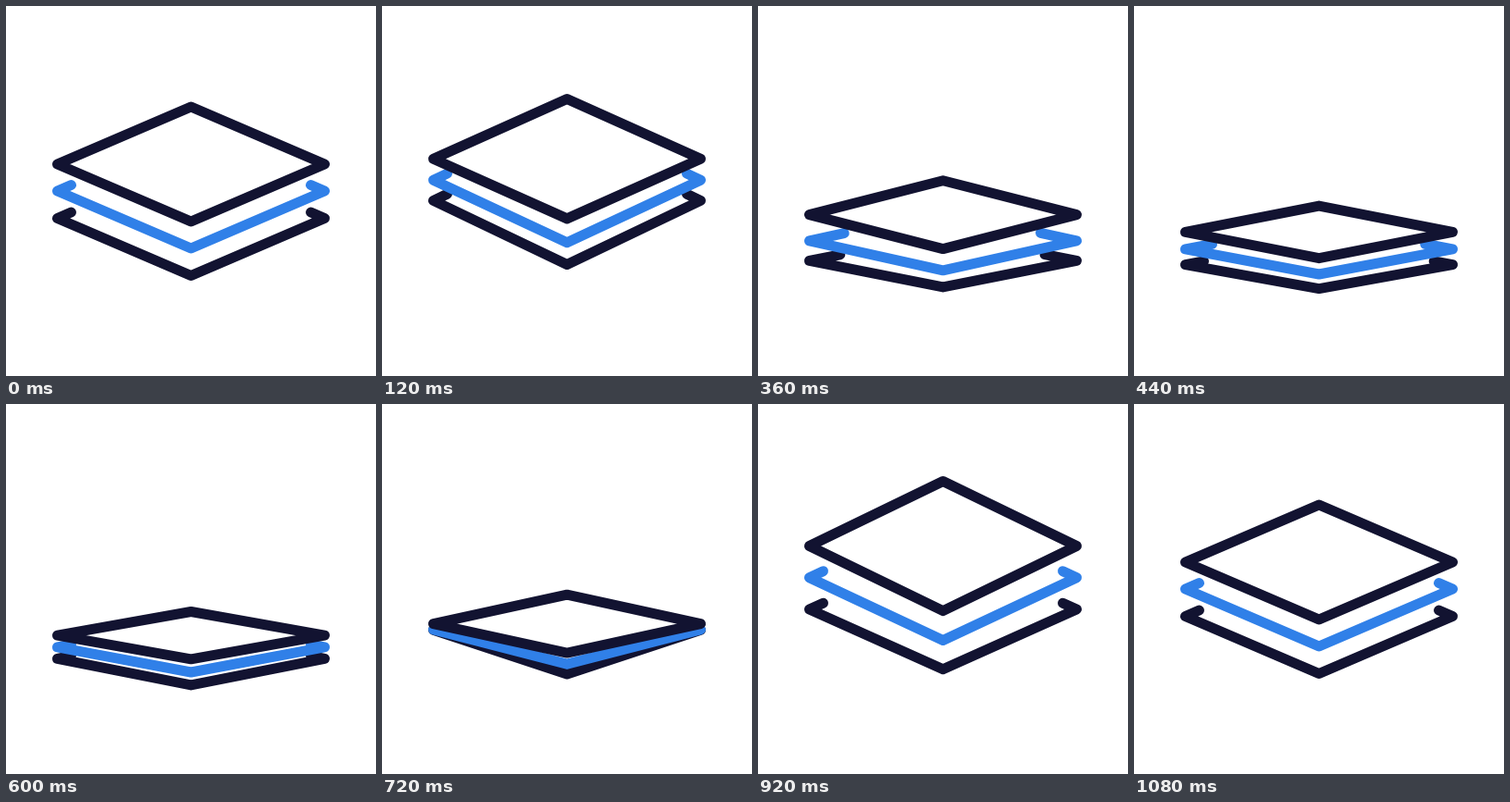
Animation of 400x400 px, one loop 1.16 s. Source, as an HTML page with a canvas:

```html
<!DOCTYPE html>
<html lang="en">
<head>
<meta charset="utf-8">
<title>Stacked layers</title>
<style>
  html, body { margin: 0; width: 100%; height: 100%; overflow: hidden; background: #fff; }
  canvas { display: block; width: 400px; height: 400px; }
</style>
</head>
<body>
<canvas id="stage"></canvas>
<script>
const LOOP = 1160, STEP = 40, LAST = 1080;
const DARK = '#121331', BLUE = '#3080e8';
const MID = 200, HALF = 144.5, TAB = 15;

const canvas = document.getElementById('stage');
const ctx = canvas.getContext('2d');
const ratio = window.devicePixelRatio || 1;
canvas.width = canvas.height = 400 * ratio;
ctx.scale(ratio, ratio);

// Each pose is [height of the side corners, half height of the rhombus].
const layers = [
  { color: DARK, lag: 0, rest: [229.5, 62], high: [208, 70], low: [280, 25.7] },
  { color: BLUE, lag: 40, rest: [200, 62], high: [181, 71], low: [265, 26] },
  { color: DARK, lag: 80, rest: [171, 62], high: [151.5, 71], low: [250.7, 25.4], closed: true }
];

function bezier(x1, y1, x2, y2) {
  const at = (a, b, s) => 3 * (1 - s) * (1 - s) * s * a + 3 * (1 - s) * s * s * b + s * s * s;
  return x => {
    if (x <= 0) return 0;
    if (x >= 1) return 1;
    let lo = 0, hi = 1;
    for (let i = 0; i < 30; i++) {
      const m = (lo + hi) / 2;
      if (at(x1, x2, m) < x) lo = m; else hi = m;
    }
    return at(y1, y2, lo);
  };
}

const phases = [
  { start: 0, end: 160, from: 'rest', to: 'high', ease: bezier(0.33, 0.33, 0.67, 1) },
  { start: 160, end: 480, from: 'high', to: 'low', ease: bezier(0.33, 0, 0, 1) },
  { start: 480, end: 800, from: 'low', to: 'high', ease: bezier(1, 0, 0.67, 1) },
  { start: 800, end: 1000, from: 'high', to: 'rest', ease: bezier(0.33, 0, 0.67, 1) }
];

// Length of the folded-back ends while a layer drops.
const tabKeys = [[160, TAB], [235, 57], [280, 42], [400, 29], [440, 20], [490, TAB]];

const mix = (a, b, p) => a + (b - a) * p;

function pose(layer, t) {
  const time = t - layer.lag;
  const ph = phases.find(p => time < p.end) || phases[phases.length - 1];
  const p = ph.ease((time - ph.start) / (ph.end - ph.start));
  const a = layer[ph.from], b = layer[ph.to];
  return { y: mix(a[0], b[0], p), h: mix(a[1], b[1], p) };
}

function tabLength(time) {
  for (let i = 1; i < tabKeys.length; i++) {
    const [t0, v0] = tabKeys[i - 1], [t1, v1] = tabKeys[i];
    if (time >= t0 && time < t1) return mix(v0, v1, (time - t0) / (t1 - t0));
  }
  return TAB;
}

function trace(points) {
  ctx.beginPath();
  points.forEach(([x, y]) => ctx.lineTo(x, y));
}

function drawLayer(layer, t) {
  const { y, h } = pose(layer, t);
  const left = MID - HALF, right = MID + HALF;
  const base = [[left, y], [MID, y + h], [right, y]];
  if (layer.closed) {
    trace([...base, [MID, y - h]]);
    ctx.closePath();
  } else {
    const a = tabLength(t - layer.lag);
    const b = TAB + (a - TAB) * 1.06;
    trace([[left + a, y - h * a / HALF], ...base, [right - b, y - h * b / HALF]]);
  }
  ctx.strokeStyle = layer.color;
  ctx.stroke();
}

function draw(t) {
  ctx.fillStyle = '#fff';
  ctx.fillRect(0, 0, 400, 400);
  ctx.lineWidth = 11;
  ctx.lineCap = ctx.lineJoin = 'round';

  // Lower layers stay hidden above the upper edge of the top one.
  const top = layers[2], { y, h } = pose(top, t);
  ctx.save();
  trace([[0, y], [MID - HALF, y], [MID, y - h], [MID + HALF, y], [400, y], [400, 400], [0, 400]]);
  ctx.clip();
  drawLayer(layers[0], t);
  drawLayer(layers[1], t);
  ctx.restore();
  drawLayer(top, t);
}

const begin = performance.now();
function tick() {
  const t = (performance.now() - begin) % LOOP;
  draw(Math.min(LAST, Math.floor(t / STEP) * STEP));
  requestAnimationFrame(tick);
}
tick();
</script>
</body>
</html>
```
